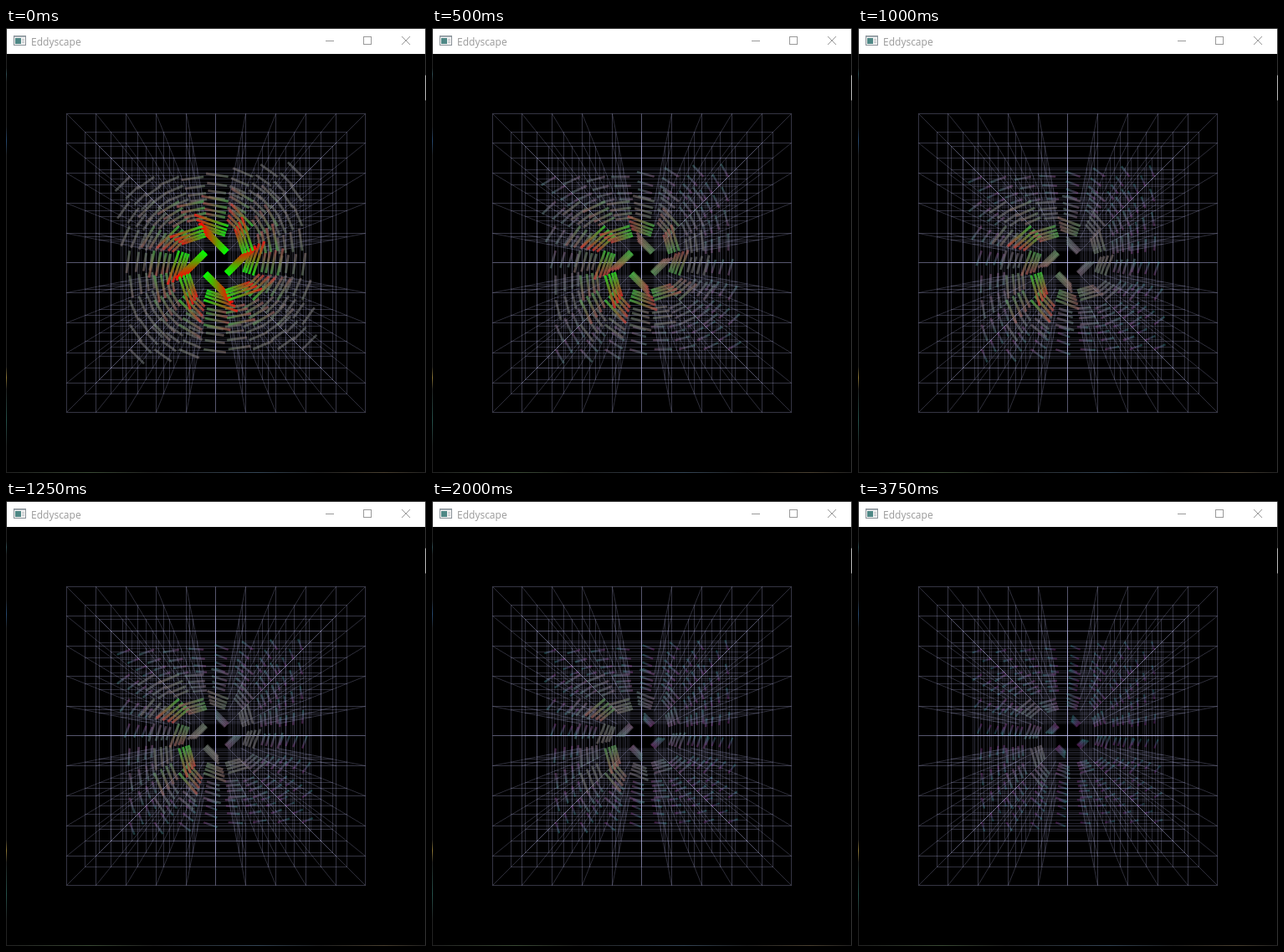
An HTML page with a canvas for the animation above (5000 ms loop, 502 px wide and 532 px high).

```html
<!DOCTYPE html>
<html lang="en">
<head>
<meta charset="utf-8">
<title>Eddyscape</title>
<style>
  html, body { margin: 0; width: 100%; height: 100%; overflow: hidden; background: #000; }
  #stage { position: relative; width: 502px; height: 532px; overflow: hidden; background: #000; }
  canvas, svg { position: absolute; left: 0; top: 0; }
  .bar { position: absolute; left: 1px; top: 1px; width: 500px; height: 30px; background: #fff; }
  .name { position: absolute; left: 30px; top: 8px; font: 12px/17px "Open Sans", "Noto Sans", sans-serif; color: #999; white-space: nowrap; }
  .edge { position: absolute; top: 0; width: 1px; height: 532px; }
  .left { left: 0; background: linear-gradient(#222 48px, #2c4a50 55px, #222 64px, #222 118px, #24476e 135px, #222 152px, #222 405px, #8a7434 418px, #222 432px, #24504a 470px, #222 500px); }
  .right { left: 501px; background: linear-gradient(#333 56px, #bbb 57px, #bbb 86px, #333 87px); }
  .top, .bottom { position: absolute; left: 0; width: 502px; height: 1px; background: #222; }
  .top { top: 0; }
  .bottom { top: 531px; background: linear-gradient(90deg, #222, #3a4a35 20%, #222 35%, #334455 60%, #222 75%, #4a4030 90%, #222); }
</style>
</head>
<body>
<div id="stage">
  <canvas id="grid" width="502" height="532"></canvas>
  <canvas id="flow" width="502" height="532"></canvas>
  <div class="bar"></div>
  <div class="edge left"></div><div class="edge right"></div>
  <div class="top"></div><div class="bottom"></div>
  <svg width="502" height="31" fill="none" stroke="#999" shape-rendering="crispEdges">
    <rect x="9.5" y="9.5" width="14" height="11" fill="#f4f4f4" stroke="#8a9298"/>
    <path d="M10 10.5h13" stroke="#a9b3ba"/>
    <rect x="11" y="12" width="7" height="7" fill="#4f8886" stroke="none"/>
    <path d="M19 13.5h3M19 15.5h3M19 17.5h3" stroke="#b8bec2"/>
    <path d="M382 15.5h10"/>
    <rect x="427.5" y="10.5" width="9" height="9"/>
    <path d="M473 10l10 10m0-10l-10 10" shape-rendering="auto"/>
  </svg>
  <div class="name">Eddyscape</div>
</div>
<script>
const CX = 250.96, CY = 280.96, FOCAL = 250.5, EYE = 2.4;
const LOOP = 5000;
const STEPS = [0, 250, 500, 750, 1000, 1250, 1500, 1750, 2000, 3000, 3750];

const scaleAt = z => FOCAL / (EYE - z);
const project = (x, y, z) => [CX + x * scaleAt(z), CY - y * scaleAt(z)];
const snap = v => Math.floor(v) + 0.5;

function line(ctx, a, b) {
  ctx.beginPath();
  ctx.moveTo(...a);
  ctx.lineTo(...b);
  ctx.stroke();
}

function drawGrid() {
  const ctx = document.getElementById('grid').getContext('2d');
  const ticks = Array.from({ length: 11 }, (_, i) => (i - 5) / 5);
  const ink = alpha => `rgba(190,190,240,${alpha})`;
  for (const z of ticks) {
    ctx.strokeStyle = ink(0.17 + 0.11 * z);
    const [x0, y0] = project(-1, 1, z).map(snap);
    const [x1, y1] = project(1, -1, z).map(snap);
    for (const p of ticks) {
      const px = snap(project(p, 0, z)[0]);
      const py = snap(project(0, p, z)[1]);
      line(ctx, [x0, py], [x1, py]);
      line(ctx, [px, y0], [px, y1]);
    }
  }
  ctx.strokeStyle = ink(0.24);
  for (const x of ticks) {
    for (const y of ticks) {
      line(ctx, project(x, y, 1).map(snap), project(x, y, -1).map(snap));
    }
  }
}

// Normalised flow speed: a vortex that dies out at its core and on the right,
// while two lobes on the left drift outwards.
function speed(r, angle, sec) {
  const lean = Math.cos(angle - 3.05);
  const left = Math.max(0, lean);
  const lobes = left * (1 - Math.cos(4 * (angle - 3.02))) / 2;
  const ring = (r / 0.45) ** 2;
  const start = 0.46 + 0.54 / (1 + (r / 0.46) ** 4);
  const decay = 0.6 - 0.25 * lean + 0.2 * left - 0.4 * lobes
    + 0.9 * Math.exp(-((r / 0.2) ** 4)) + 0.6 * r ** 4;
  const drift = 0.2 * lobes * ring * Math.exp(1 - ring) * sec * Math.exp(1 - sec);
  return Math.min(1, 0.1 + (start - 0.1) / (1 + decay * sec) + drift);
}

function rgba(r, g, b, a) {
  return `rgba(${[r, g, b].map(v => Math.round(v * 255))},${a})`;
}

const flow = document.getElementById('flow').getContext('2d');

function drawArrow(x, y, z, sec) {
  const r = Math.hypot(x, y);
  const angle = Math.atan2(y, x);
  const m = speed(r, angle, sec);
  const len = 0.02 + 0.3 * m;
  // Tangential at first, then spiralling outwards.
  const heading = angle + Math.PI / 2 - 0.5 * r * r * (1 - Math.exp(-1.5 * sec));
  const a = project(x, y, z);
  const b = project(x + len * Math.cos(heading), y + len * Math.sin(heading), z);
  const alpha = 0.08 + 0.92 * m;
  const fade = flow.createLinearGradient(...a, ...b);
  fade.addColorStop(0, rgba(1 - m, m, 1 - m, alpha));
  fade.addColorStop(1, rgba(m, 1 - m, 1 - m, alpha));
  flow.strokeStyle = fade;
  flow.lineWidth = Math.min(3, 1.8 + 2 * m);
  line(flow, a, b);
}

function drawFlow(sec) {
  const spots = Array.from({ length: 8 }, (_, i) => (2 * i - 7) / 10);
  flow.clearRect(0, 0, 502, 532);
  for (const z of [0.1, 0.3, 0.5, 0.7]) {
    for (const x of spots) for (const y of spots) drawArrow(x, y, z, sec);
  }
}

let shown = -1;
const begin = performance.now();
function tick() {
  const t = (performance.now() - begin) % LOOP;
  const step = STEPS.filter(s => s <= t).pop();
  if (step !== shown) {
    shown = step;
    drawFlow(step / 1000);
  }
  requestAnimationFrame(tick);
}

drawGrid();
tick();
</script>
</body>
</html>
```
